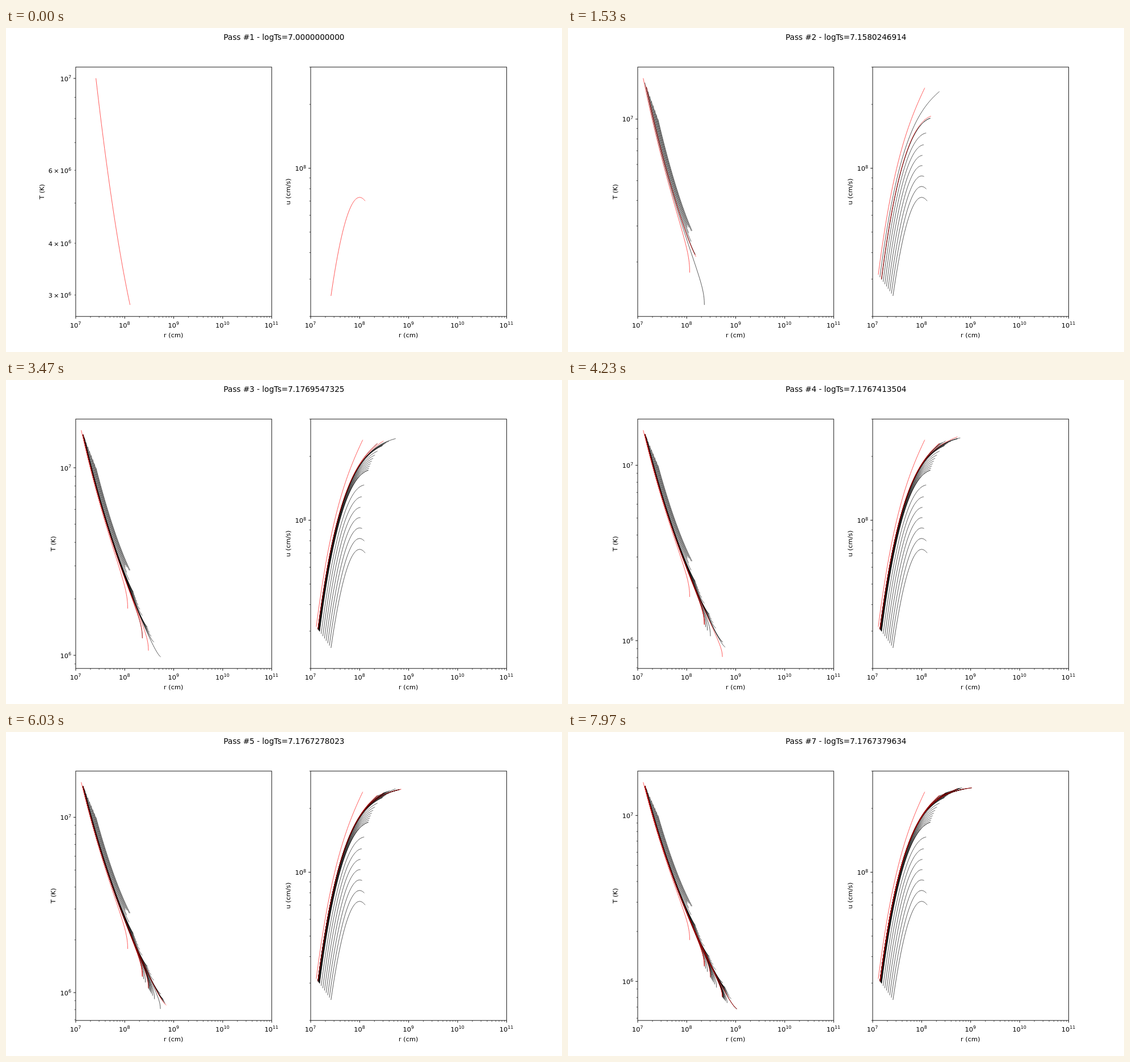
An HTML page that plays this animation: 980x572 px, repeating every 8000 ms.

```html
<!DOCTYPE html>
<html lang="en">
<head>
<meta charset="utf-8">
<title>Shooting passes</title>
<style>
  html, body { margin: 0; width: 100%; height: 100%; overflow: hidden; background: #fff; }
  svg { display: block; width: 980px; height: 572px; }
  text { font-family: "DejaVu Sans", sans-serif; font-size: 11.34px; fill: #000; }
  .frame { fill: none; stroke: #000; stroke-width: .9; }
  .major { stroke: #000; stroke-width: .9; }
  .minor { stroke: #000; stroke-width: .68; }
  .curve { fill: none; stroke-width: .65; stroke-linejoin: round; }
</style>
</head>
<body>
<svg viewBox="0 0 980 572">
  <text id="title" x="490" y="21" text-anchor="middle" style="font-size:13.61px"></text>
  <g id="axes"></g>
  <g id="ticks"></g>
  <g id="curves"></g>
</svg>
<script>
const LOOP = 8000, STEP = 400 / 3, LEAD = 37.5;
const LEFT = 122.9, RIGHT = 537, WIDTH = 345.4, TOP = 69, HEIGHT = 440.2;
const BOTTOM = TOP + HEIGHT, DECADE = WIDTH / 4, SHIFT = 414.3;
const CRITICAL = 7.1767382134;
const { exp, log10, abs } = Math;
const $ = id => document.getElementById(id);

// Temperature drop (dex over dex) and velocity rise (px over px) from the start point,
// for the coolest solution and for the critical one.
const coolDrop = d => 1.02 * d - .336 * d * d;
const critDrop = d => .45 * d + .595 * (1 - exp(-d / .85));
const hump = (t, peak) => 1 - (1 - t / peak) ** 2;
const coolRise = t => 174 * hump(t, 50.5);
const critRise = t => 345 * (1 - exp(-t / 45 - (t / 165) ** 2));

// Solutions run further the closer they start to the critical value.
const underEnd = (m, w) => 181 + 28.65 * m - 1.665 * m * m + 17 * exp(-((w / .3) ** 2));
const overEnd = m => 175 + 26.95 * m - 1.69 * m * m;

function solve(logTs) {
  const s = logTs - 7, w = s / (CRITICAL - 7), over = w > 1;
  const m = -log10(abs(logTs - CRITICAL));
  const x0 = 158.5 - 129.5 * s, x1 = over ? overEnd(m) : underEnd(m, w);
  const mix = (cool, crit, v) => (1 - w) * cool(v) + w * crit(v);
  return Array.from({ length: 49 }, (_, i) => {
    const t = (x1 - x0) * (1 - (1 - i / 48) ** 1.6);
    const x = x0 + t, back = x1 - x;
    let logT = logTs - mix(coolDrop, critDrop, t / DECADE);
    let rise = mix(coolRise, critRise, t);
    if (over) {
      logT -= (.123 - .012 * m) * exp(-1.3 * Math.sqrt(back / 6));
      rise += 3 * exp(-back / 20);
    } else {
      logT += .03 * w ** 4 * exp(-back / 8);
      rise += 55 * w * (1 - w) * hump(t, 60);
    }
    return { x, logT, y: 473 - 187 * s - rise };
  });
}

// Each pass scans ten values, then narrows to the interval around the critical one.
const runs = [];
for (let pass = 1, lo = 7, hi = 7.2; pass <= 7; pass++) {
  const gap = (hi - lo) / 9;
  for (let i = 0; i < 10; i++) {
    const logTs = lo + gap * i;
    runs.push({ pass, logTs, last: i === 9, pts: solve(logTs) });
  }
  lo += gap * Math.floor((CRITICAL - lo) / gap);
  hi = lo + gap;
}

const line = (kind, x1, y1, x2, y2) => `<line class="${kind}" x1="${x1}" y1="${y1}" x2="${x2}" y2="${y2}"/>`;
const power = (x, y, e, anchor, m) => {
  const lead = m > 1 ? `${m}<tspan dx="2">×</tspan><tspan dx="2">10</tspan>` : '10';
  return `<text x="${x}" y="${y}" text-anchor="${anchor}">${lead}<tspan dy="-4.3" style="font-size:7.94px">${e}</tspan></text>`;
};
const upright = (x, label) =>
  `<text transform="translate(${x} 289) rotate(-90)" text-anchor="middle">${label}</text>`;

function yTicks(x, min, max) {
  const labelMinor = max - min <= 1;
  let out = '';
  for (let e = Math.floor(min); e <= max; e++) {
    for (let m = 1; m < 10; m++) {
      const v = e + log10(m);
      if (v < min - 1e-6 || v > max + 1e-6) continue;
      const y = TOP + (max - v) / (max - min) * HEIGHT;
      out += m === 1 ? line('major', x - 3.97, y, x, y) : line('minor', x - 2.27, y, x, y);
      if (m === 1 || labelMinor && [2, 3, 4, 6].includes(m)) out += power(x - 7.9, y + 4.6, e, 'end', m);
    }
  }
  return out;
}

function panel(x) {
  let out = `<rect class="frame" x="${x}" y="${TOP}" width="${WIDTH}" height="${HEIGHT}"/>`;
  for (let e = 0; e <= 4; e++) {
    const tx = x + e * DECADE;
    out += line('major', tx, BOTTOM, tx, BOTTOM + 3.97) + power(tx - .4, 528.7, e + 7, 'middle');
    for (let m = 2; m < 10 && e < 4; m++) {
      const mx = tx + log10(m) * DECADE;
      out += line('minor', mx, BOTTOM, mx, BOTTOM + 2.27);
    }
  }
  return out + `<text x="${x + WIDTH / 2 - .4}" y="545.6" text-anchor="middle">r (cm)</text>`;
}

$('axes').innerHTML = panel(LEFT) + panel(RIGHT)
  + yTicks(RIGHT, log10(2e7), log10(3e8)) + upright(501, 'u (cm/s)');

const path = (pts, color) =>
  `<path class="curve" stroke="${color}" d="M${pts.map(p => p.map(v => v.toFixed(2)).join(' ')).join('L')}"/>`;

function draw(step) {
  const shown = runs.slice(0, step + 1), now = runs[step];
  const temps = shown.flatMap(r => r.pts.map(p => p.logT));
  const low = Math.min(...temps), high = Math.max(...temps), pad = (high - low) * .05;
  const min = low - pad, max = high + pad;
  const yT = v => TOP - .3 + (max - v) / (max - min) * HEIGHT;

  $('title').textContent = `Pass #${now.pass} - logTs=${now.logTs.toFixed(10)}`;
  $('ticks').innerHTML = yTicks(LEFT, min, max) + upright(max - min <= 1 ? 67 : 87, 'T (K)');
  $('curves').innerHTML = shown.map(r => {
    const color = r === now || r.last ? '#f00' : '#000';
    return path(r.pts.map(p => [p.x, yT(p.logT)]), color)
      + path(r.pts.map(p => [p.x + SHIFT, p.y]), color);
  }).join('');
}

let current = -1;
const start = performance.now();
function tick() {
  const t = (performance.now() - start) % LOOP;
  const step = Math.floor((t + LEAD) / STEP);
  if (step !== current) draw(current = step);
  requestAnimationFrame(tick);
}
tick();
</script>
</body>
</html>
```
